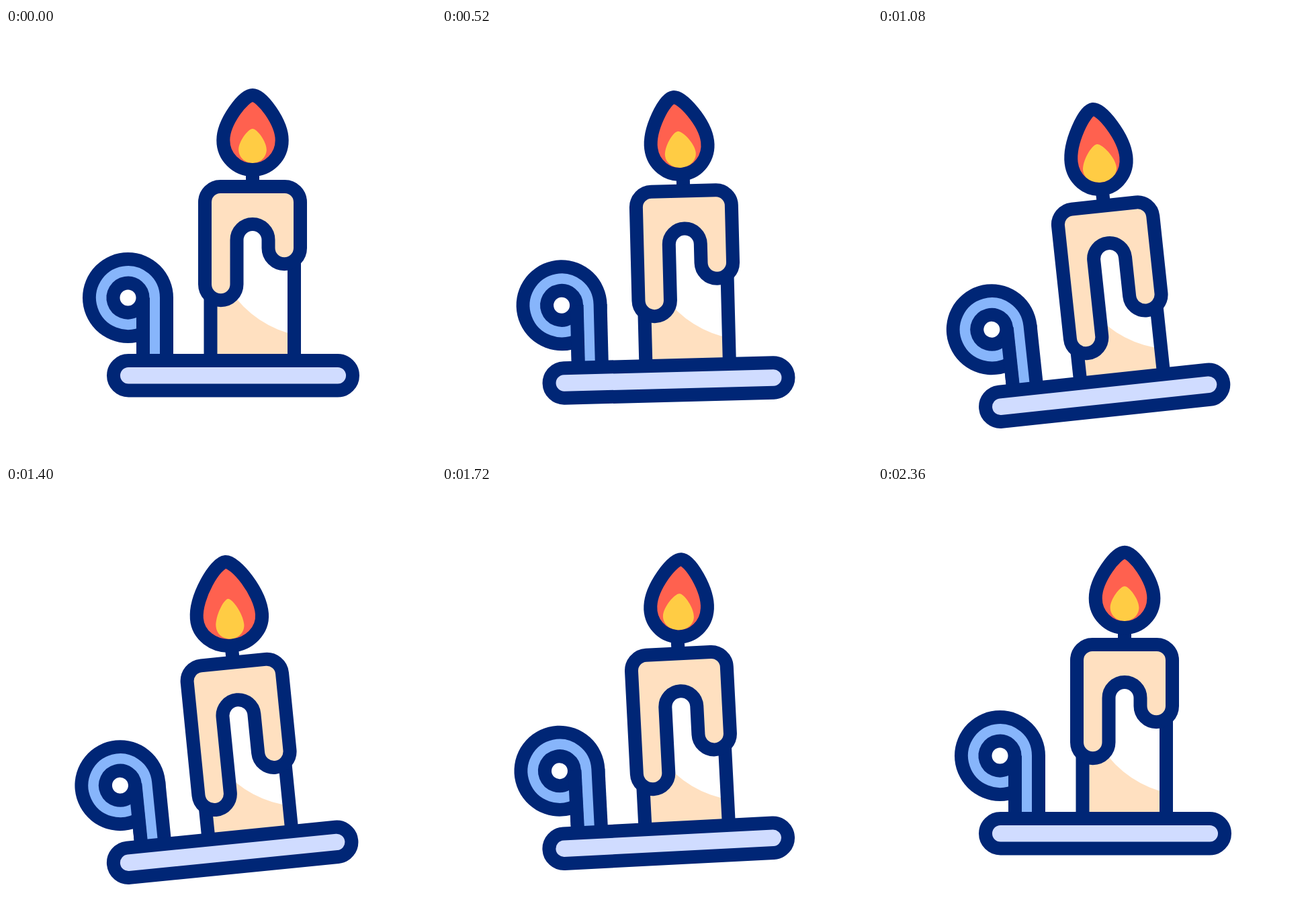
Animation of 640x640 px, one loop 2.4 s. Source, as an HTML page:

```html
<!DOCTYPE html>
<html lang="en">
<head>
<meta charset="utf-8">
<title>Candle</title>
<style>
  html, body { margin: 0; width: 100%; height: 100%; overflow: hidden; background: #fff; }
  svg { display: block; width: 100vw; height: 100vh; }
  .line { stroke: #002676; stroke-width: 20; stroke-linejoin: round; }
  .ink { fill: #002676; }
</style>
</head>
<body>
<svg viewBox="0 0 640 640" fill="none">
  <clipPath id="inside"><path d="M304 280H430V495H304Z"/></clipPath>
  <g id="candle">
    <!-- handle -->
    <circle class="ink" cx="181.5" cy="401.5" r="67.5"/>
    <path class="ink" d="M194 401.5H249V490H194Z"/>
    <path d="M200 436.7A39.75 39.75 0 1 1 221.25 401.5V488" stroke="#87b5fb" stroke-width="15.5"/>
    <path class="line" d="M204 401.5V490"/>
    <circle cx="181.5" cy="401.5" r="12" fill="#fff"/>

    <!-- body -->
    <g clip-path="url(#inside)">
      <path d="M304 280H430V495H304Z" fill="#ffe0c0"/>
      <circle cx="464" cy="304" r="156.3" fill="#fff"/>
    </g>
    <path class="line" d="M304.5 300V495M429 300V495"/>
    <rect class="line" x="160" y="495" width="356" height="44.5" rx="22.25" fill="#d0dcff"/>

    <path class="line" d="M367 211V236"/>
    <path class="line" id="wax" fill="#ffe0c0"/>

    <g id="flame">
      <path id="red" fill="#ff614f"/>
      <path id="yellow" fill="#ffcc44"/>
      <path class="line" id="rim"/>
    </g>
  </g>
</svg>
<script>
const el = id => document.getElementById(id);
const ease = u => (1 - Math.cos(Math.PI * Math.min(1, Math.max(0, u)))) / 2;

// Eased value between evenly spaced keys that wrap around
function cycle(keys, step, t) {
  const pos = t / step, i = Math.floor(pos), n = keys.length;
  const from = keys[i % n], to = keys[(i + 1) % n];
  return from + (to - from) * ease(pos - i);
}

// Teardrop centred on x = 367
function drop(top, half, mid, bottom) {
  const shoulder = top + 0.6 * (mid - top), low = mid + 0.56 * (bottom - mid);
  const x = k => 367 + k * half;
  return `M367 ${top}C${x(-.31)} ${top} ${x(-1)} ${shoulder} ${x(-1)} ${mid}` +
    `C${x(-1)} ${low} ${x(-.55)} ${bottom} 367 ${bottom}` +
    `C${x(.55)} ${bottom} ${x(1)} ${low} ${x(1)} ${mid}` +
    `C${x(1)} ${shoulder} ${x(.31)} ${top} 367 ${top}Z`;
}

function waxPath(drip) {
  return `M296 259a23 23 0 0 1 23-23H415a23 23 0 0 1 23 23V${327.5 + drip}` +
    `a23.75 23.75 0 0 1-47.5 0V315.5a23.5 23.5 0 0 0-47 0V${381.5 + drip}` +
    `a23.75 23.75 0 0 1-47.5 0Z`;
}

function draw(now) {
  const t = now % 2400;
  const tilt = 6.3 * ease((1000 - Math.abs(t - 1200)) / 1000);
  const drip = 46.5 * ease((1000 - Math.abs(t - 1200)) / 800);
  const lean = cycle([0, -6, 0, 6], 600, t);

  el("candle").setAttribute("transform", `rotate(${-tilt} 620 540)`);
  el("wax").setAttribute("d", waxPath(drip));
  el("flame").setAttribute("transform", `rotate(${lean} 367 211)`);

  const outer = drop(cycle([100, 86, 87], 200, t), cycle([43.7, 48.7, 39.7], 200, t), 167, 211);
  el("red").setAttribute("d", outer);
  el("rim").setAttribute("d", outer);
  el("yellow").setAttribute("d",
    drop(cycle([150, 141, 140.5], 200, t), cycle([20.8, 21, 27.3], 200, t), 181, 201));
  requestAnimationFrame(draw);
}
draw(performance.now());
</script>
</body>
</html>
```
